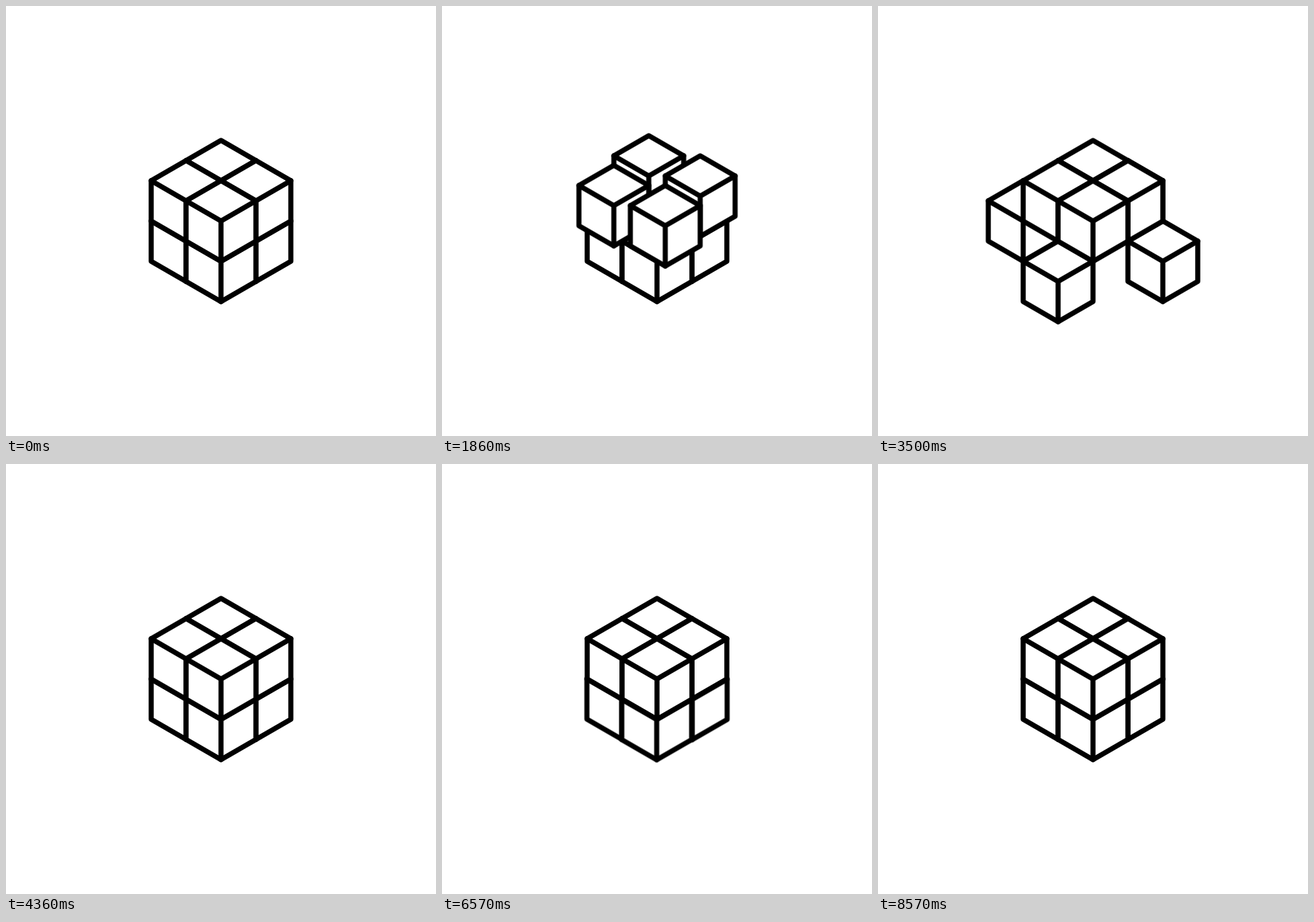
An HTML page without scripts that plays this animation: 640 by 640 pixels, repeating every 8640 ms.

```html
<!DOCTYPE html>
<html lang="en">
<head>
<meta charset="utf-8">
<title>Cube shuffle</title>
<style>
  html, body {
    margin: 0;
    width: 100%;
    height: 100%;
    overflow: hidden;
    background: #fff;
  }

  .stage, .layer, .cube { transform-style: preserve-3d; }

  .stage {
    position: absolute;
    left: 0;
    top: 0;
    width: 640px;
    height: 640px;
  }

  /* Two layers of four cubes swap height; z only sets the paint order. */
  .layer {
    position: absolute;
    inset: 0;
    animation: swap 8640ms infinite;
  }
  .one { --from: 0; --to: 1; --delay: 0ms; }
  .two { --from: 1; --to: 0; --delay: -4308ms; }

  /* a and b: direction of the first slide; the second is a quarter turn on. */
  .cube {
    position: absolute;
    left: 260px;
    top: 280px;
    width: 120px;
    height: 140px;
    transform: translate3d(
      calc((var(--a) - var(--b)) * 25.98px),
      calc((var(--a) + var(--b)) * 15px),
      calc((var(--a) + var(--b)) * 5px));
    animation: slide 8640ms var(--delay) infinite;
  }
  .back  { --a: -1; --b: -1; }
  .right { --a: 1;  --b: -1; }
  .left  { --a: -1; --b: 1; }
  .front { --a: 1;  --b: 1; }

  svg { display: block; }
  .shape {
    fill: #fff;
    stroke: #000;
    stroke-width: 7.5;
    stroke-linejoin: round;
    stroke-linecap: round;
  }

  /* Each move is split at its midpoint: quartic in and out. */
  @keyframes swap {
    0%, 8.218%, 41.4%, 58.356%, 91.539%, 100% {
      transform: translate3d(0, calc(var(--from) * -60px), calc(var(--from) * 10px));
      animation-timing-function: cubic-bezier(.5, 0, .75, 0);
    }
    12.384%, 37.234%, 62.523%, 87.373% {
      transform: translate3d(0, -30px, 5px);
      animation-timing-function: cubic-bezier(.25, 1, .5, 1);
    }
    16.551%, 33.067%, 66.69%, 83.206% {
      transform: translate3d(0, calc(var(--to) * -60px), calc(var(--to) * 10px));
      animation-timing-function: cubic-bezier(.5, 0, .75, 0);
    }
  }

  /* Cubic in and out. */
  @keyframes slide {
    0%, 24.769%, 24.826%, 49.653%, 100% {
      translate: 0px 0px 0px;
      animation-timing-function: cubic-bezier(.3333, 0, .6667, 0);
    }
    4.132%, 20.625% {
      translate: calc(var(--a) * 25.98px) calc(var(--b) * 15px) calc(var(--b) * 5px);
      animation-timing-function: cubic-bezier(.3333, 1, .6667, 1);
    }
    8.275%, 16.493% {
      translate: calc(var(--a) * 51.96px) calc(var(--b) * 30px) calc(var(--b) * 10px);
      animation-timing-function: cubic-bezier(.3333, 0, .6667, 0);
    }
    28.958%, 45.509% {
      translate: calc(var(--b) * -25.98px) calc(var(--a) * 15px) calc(var(--a) * 5px);
      animation-timing-function: cubic-bezier(.3333, 1, .6667, 1);
    }
    33.102%, 41.377% {
      translate: calc(var(--b) * -51.96px) calc(var(--a) * 30px) calc(var(--a) * 10px);
      animation-timing-function: cubic-bezier(.3333, 0, .6667, 0);
    }
  }
</style>
</head>
<body>
<svg width="0" height="0" style="position:absolute">
  <defs>
    <g id="box" class="shape">
      <path d="M0 0L51.96 30V90L0 120L-51.96 90V30Z"/>
      <path fill="none" d="M-51.96 30L0 60L51.96 30M0 60V120"/>
    </g>
  </defs>
</svg>
<div class="stage">
  <div class="layer one">
    <div class="cube back"><svg width="120" height="140" viewBox="-60 -10 120 140"><use href="#box"/></svg></div>
    <div class="cube right"><svg width="120" height="140" viewBox="-60 -10 120 140"><use href="#box"/></svg></div>
    <div class="cube left"><svg width="120" height="140" viewBox="-60 -10 120 140"><use href="#box"/></svg></div>
    <div class="cube front"><svg width="120" height="140" viewBox="-60 -10 120 140"><use href="#box"/></svg></div>
  </div>
  <div class="layer two">
    <div class="cube back"><svg width="120" height="140" viewBox="-60 -10 120 140"><use href="#box"/></svg></div>
    <div class="cube right"><svg width="120" height="140" viewBox="-60 -10 120 140"><use href="#box"/></svg></div>
    <div class="cube left"><svg width="120" height="140" viewBox="-60 -10 120 140"><use href="#box"/></svg></div>
    <div class="cube front"><svg width="120" height="140" viewBox="-60 -10 120 140"><use href="#box"/></svg></div>
  </div>
</div>
</body>
</html>
```
